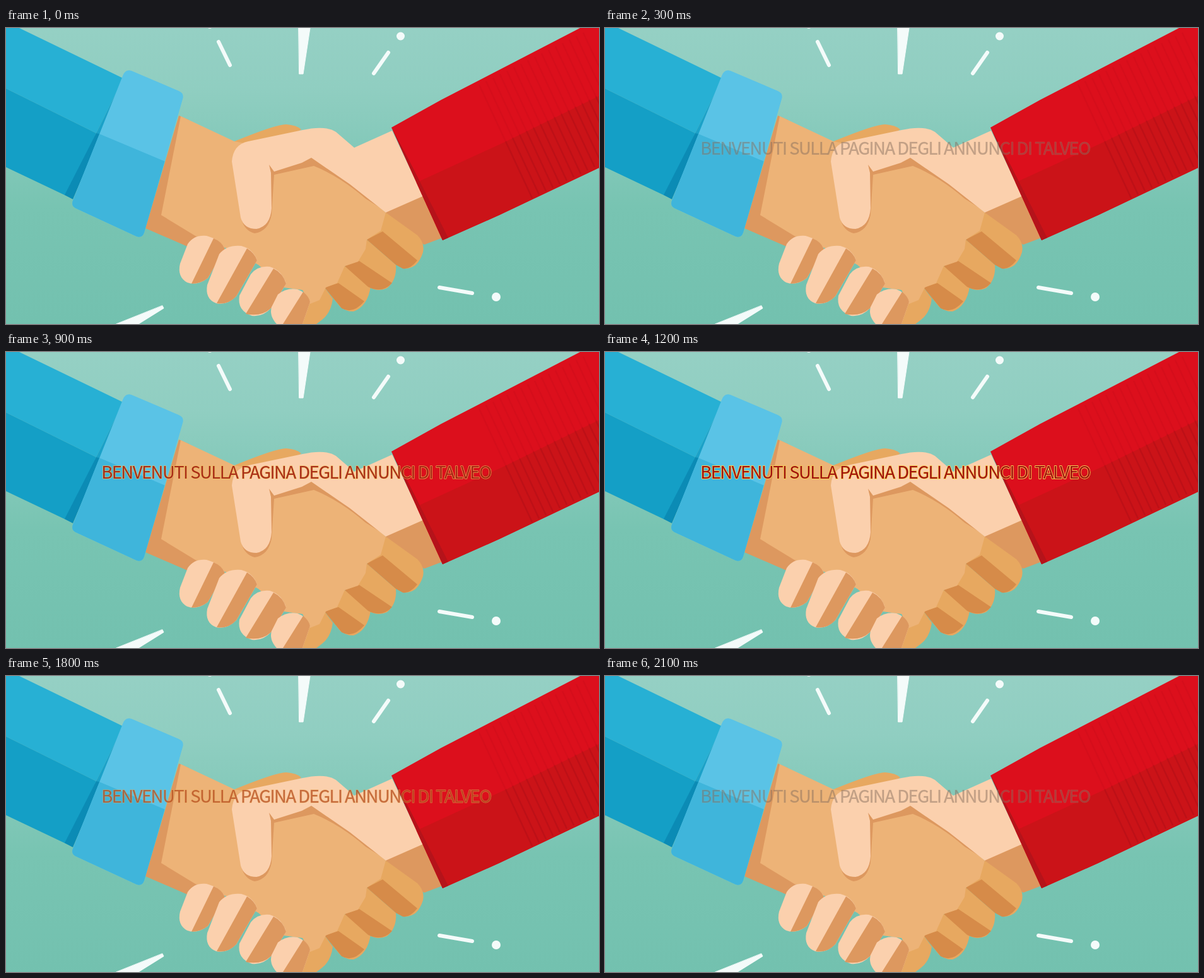
Recreate the animation shown at these times as an HTML page. Size 940x470 px, loop 2.4 s.

```html
<!DOCTYPE html>
<html lang="it">
<head>
<meta charset="utf-8">
<title>Benvenuti</title>
<style>
html, body { margin: 0; width: 100%; height: 100%; overflow: hidden; }
svg { display: block; width: 940px; height: 470px; }
.light { fill: #fbd0ad; }
.shade { fill: #dd985f; }
.tan { fill: #edb377; }
.gold { fill: #e7a860; }
.brown { fill: #d68b49; }
#title {
  font-family: "Noto Sans CJK JP", "Noto Sans CJK SC", "Liberation Sans", sans-serif;
  letter-spacing: -.055em;
  text-anchor: middle;
  stroke-linejoin: round;
  paint-order: stroke;
}
</style>
</head>
<body>
<svg viewBox="0 0 940 470">
  <defs>
    <linearGradient id="sky" x2="0" y2="1">
      <stop stop-color="#95d0c4"/>
      <stop offset=".2" stop-color="#90cec1"/>
      <stop offset=".6" stop-color="#78c4b2"/>
      <stop offset="1" stop-color="#73c1af"/>
    </linearGradient>
    <clipPath id="sleeve"><path d="M611 158L690 114 910 0H940V222L782 297 692 337Z"/></clipPath>
    <clipPath id="cuff"><path d="M199 68L274 100Q283 104 280 113L219 325Q216 334 207 331L110 286Q103 282 106 274L185 76Q189 65 199 68Z"/></clipPath>
  </defs>
  <rect width="940" height="470" fill="url(#sky)"/>

  <g fill="#f4fbfa" stroke="#f4fbfa" stroke-linecap="round">
    <path d="M464 0H482L471 73H465Z M248 441L250 445 210 470H175Z" stroke-width="1"/>
    <path d="M337 22L355 59M606 39L583 72M687 412L739 421" stroke-width="6"/>
    <g stroke="none">
      <circle cx="323" cy="-4" r="5"/>
      <circle cx="625.5" cy="13" r="6.5"/>
      <circle cx="777" cy="427" r="7"/>
    </g>
  </g>

  <!-- blue sleeve -->
  <path fill="#27b0d4" d="M0 0H21L186 80 143 167 0 96Z"/>
  <path fill="#149fc6" d="M0 96L143 167 105 271 0 221Z"/>
  <path fill="#0b8bb5" d="M143 167L158 150 106 272 93 265Z"/>
  <path fill="#1ba1c8" d="M186 80L143 167 155 170Z"/>

  <!-- wrists and back of the hands -->
  <path class="shade" d="M274 139L290 146 256 295 306 328 290 348 221 318Z"/>
  <path class="gold" d="M362 180Q428 153 444 153 460 154 468 161L400 210Z"/>
  <path class="shade" d="M600 292L660 266 692 333 663 344 630 325Z"/>

  <!-- far fingers -->
  <path class="gold" d="M480 425L505 412 518 430Q515 453 500 464L492 470H465Z"/>
  <path class="gold" d="M505 412L537 378 578 411Q573 442 551 450 541 451 530 443Z"/>
  <path class="brown" d="M505 412L527 405 568 434Q550 455 532 445Z"/>
  <path class="gold" d="M537 378L572 336 618 376Q620 400 604 413 590 420 574 411Z"/>
  <path class="brown" d="M537 378L560 370 612 405Q596 422 574 411Z"/>
  <path class="gold" d="M572 336L602 293 652 329Q664 341 661 356 653 382 633 382 625 381 618 375Z"/>
  <path class="brown" d="M572 336L597 323 652 369Q640 384 629 382L618 376Z"/>

  <path class="tan" d="M277 140L362 180 470 200 550 245 602 293 594 322 572 336 570 351 558 371 537 378 525 405 507 412 497 432 482 438 470 416 440 412 400 376 350 350 300 330 246 297Z"/>
  <g clip-path="url(#cuff)">
    <path fill="#5ac3e6" d="M80 50H300V350H80Z"/>
    <path fill="#3fb5db" d="M80 136L143 166 250 211 300 232V350H80Z"/>
  </g>

  <!-- near thumb with its shadow -->
  <path class="shade" d="M418 215L485 204 540 240 605 293 570 271Q530 236 488 219L425 233 421 296Q416 323 394 326 378 322 373 303Z"/>
  <path class="light" d="M358 212Q360 185 384 180L470 162Q506 154 523 165L552 190 612 163 661 267 602 293 545 248 484 206 469 214 425 228 417 217 420 230 421 286Q419 315 397 319 377 319 372 301Z"/>

  <!-- near fingers: whole shape, then its shaded side -->
  <path class="light" d="M288 343Q298 328 318 330 340 336 347 351L320 397Q303 410 287 404 271 395 276 374Z"/>
  <path class="shade" d="M329 334Q342 339 347 351L320 397Q309 406 294 406Z"/>
  <path class="light" d="M338 359Q350 344 373 346 392 351 398 369L365 426Q350 441 333 437 315 430 319 408Z"/>
  <path class="shade" d="M382 350Q394 357 398 369L365 426Q352 440 334 437Z"/>
  <path class="light" d="M388 391Q399 377 418 379 438 385 444 406L420 445Q407 459 390 457 366 449 370 425Z"/>
  <path class="shade" d="M424 382Q439 389 444 406L420 445Q405 459 380 454Z"/>
  <path class="light" d="M431 423Q445 412 462 415 477 420 482 435L470 470H429Q417 457 421 443Z"/>
  <path class="shade" d="M471 419Q480 426 482 435L470 470H439Z"/>

  <!-- red sleeve -->
  <g clip-path="url(#sleeve)">
    <path fill="#dc0f1c" d="M600 0H940V350H600Z"/>
    <path fill="#cb1318" d="M645 248L795 179 940 108V350H692Z"/>
    <path fill="#b5131a" d="M611 158L640 212 703 337H692Z"/>
    <g fill="none" stroke="#a90d17" stroke-width="2.5">
      <path id="upperRibs" opacity=".14"/>
      <path id="lowerRibs" opacity=".42"/>
    </g>
  </g>

  <text id="title" x="460" y="201" font-size="32">BENVENUTI SULLA PAGINA DEGLI ANNUNCI DI TALVEO</text>
</svg>
<script>
const byId = id => document.getElementById(id);
const title = byId('title');
const STEP = 300, WIDTH = 618;

// Parallel knit lines, each starting further along the arm.
const ribs = (x, y) => Array.from({ length: 16 }, (_, i) =>
  `M${x + i * 11} ${y - i * 5.5}l42 90`).join('');
byId('upperRibs').setAttribute('d', ribs(750, 90));
byId('lowerRibs').setAttribute('d', ribs(792, 180));

title.setAttribute('font-size', 32 * WIDTH / title.getComputedTextLength());

// Fill, fill opacity, outline, outline opacity and outline width by strength.
const looks = [
  ['none', 0, 'none', 0, 0],
  ['#80685a', 0.45, '#b89a78', 0.25, 1],
  ['#b5491f', 0.75, '#e3a856', 0.55, 1.3],
  ['#a32012', 0.92, '#efc25a', 0.8, 1.6],
  ['#a01010', 1, '#f5cd55', 1, 1.8]
];
const keys = ['fill', 'fill-opacity', 'stroke', 'stroke-opacity', 'stroke-width'];

function draw(now) {
  const step = Math.floor(now / STEP) % 8;
  const look = looks[4 - Math.abs(4 - step)];
  keys.forEach((key, i) => title.setAttribute(key, look[i]));
  requestAnimationFrame(draw);
}
draw(performance.now());
</script>
</body>
</html>
```
